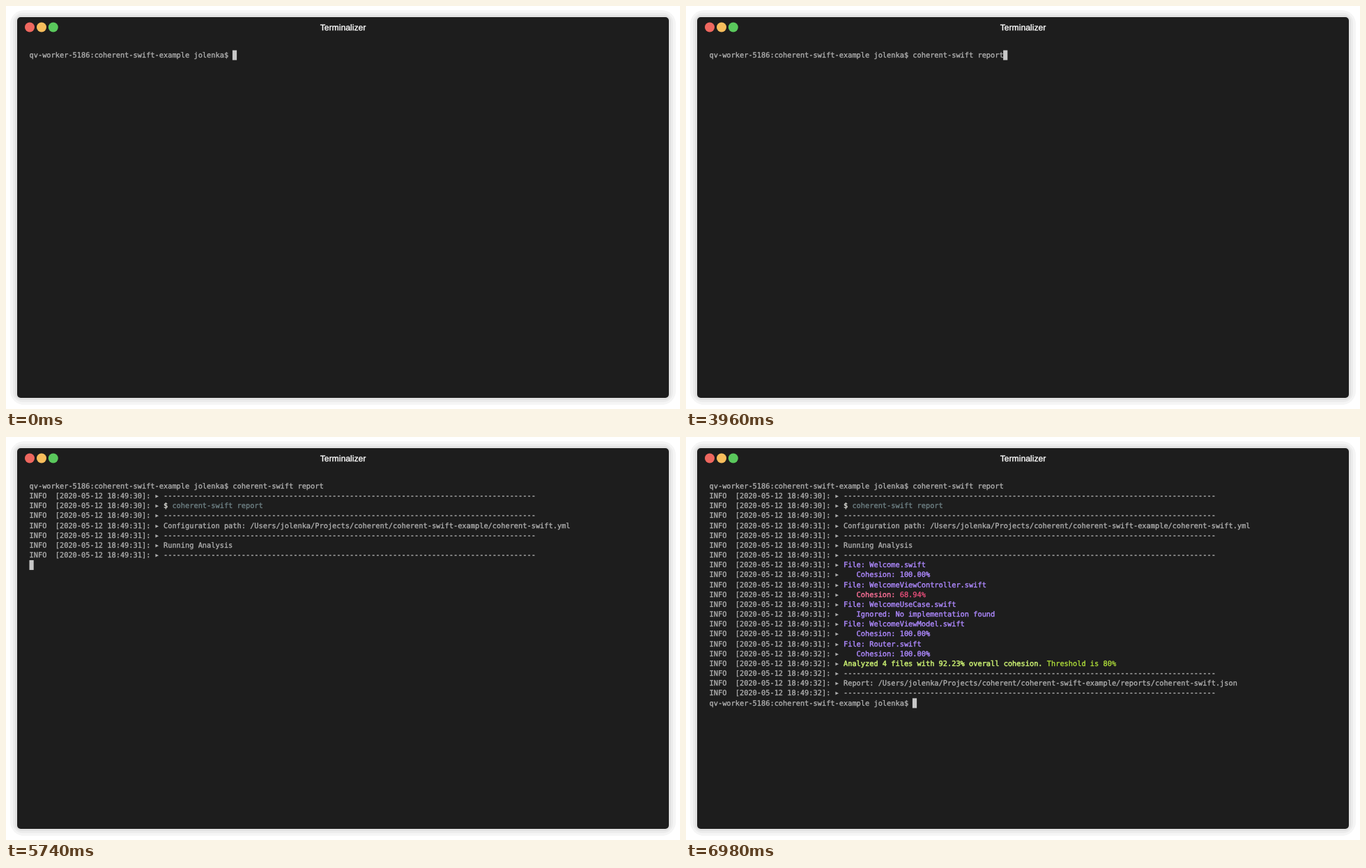
An HTML page for the animation above (8.98 s loop, 967 by 579 pixels).

```html
<!DOCTYPE html>
<html lang="en">
<head>
<meta charset="utf-8">
<title>Terminal</title>
<style>
  html, body { margin: 0; width: 100%; height: 100%; overflow: hidden; background: #fff; }
  svg { display: block; width: 100%; height: 100%; }
  text { white-space: pre; text-rendering: geometricPrecision; fill: currentColor; stroke: currentColor; }
  tspan { fill: currentColor; stroke: currentColor; }
  #rows { font: 10.32px "DejaVu Sans Mono", monospace; color: #b2b2b2; stroke-width: .3; }
  .title { font: 12.2px "Liberation Sans", Arial, sans-serif; color: #fff; stroke-width: .35; }
  .cmd { color: #708387; }
  .dollar { color: #d5d5d0; stroke-width: .4; }
  .file { color: #ae89fe; stroke-width: .4; }
  .low { color: #fb7098; stroke-width: .4; }
  .lowValue { color: #f0507f; }
  .total { color: #c8ed71; stroke-width: .5; }
  .limit { color: #b3e33b; }
</style>
</head>
<body>
<svg viewBox="0 0 967 579">
  <rect x="6" y="6" width="955" height="567" rx="20" fill="#f5f5f5"/>
  <rect x="10" y="10" width="947" height="559" rx="14" fill="#ececec"/>
  <rect x="13" y="13" width="941" height="553" rx="9" fill="#e2e2e2"/>
  <rect x="16" y="16" width="935" height="547" rx="5" fill="#1d1d1d"/>
  <circle cx="34" cy="30.5" r="7" fill="#ee675f"/>
  <circle cx="51" cy="30.5" r="7" fill="#f6bd5c"/>
  <circle cx="67.8" cy="30.5" r="7" fill="#5ac85c"/>
  <text class="title" x="483.5" y="35.2" text-anchor="middle">Terminalizer</text>
  <g id="rows"></g>
  <rect id="cursor" width="6.2" height="14.1" fill="#c7c7c7"/>
</svg>
<script>
const LOOP = 8980, LEFT = 33.5, TOP = 63.6, COL = 6.2, ROW = 14.17;
const NS = "http://www.w3.org/2000/svg";
const user = "jolenka";
const prompt = `qv-worker-5186:coherent-swift-example ${user}$ `;
const command = "coherent-swift report";
const home = `/Users/${user}/Projects/coherent/coherent-swift-example/`;

// Each span is [text, class]
const rule = ["-".repeat(86)];
const file = name => ["File: " + name + ".swift", "file"];
const note = text => ["   " + text, "file"];
const full = note("Cohesion: 100.00%");

const log = [
  [30, rule],
  [30, ["$ ", "dollar"], [command, "cmd"]],
  [30, rule],
  [31, ["Configuration path: " + home + "coherent-swift.yml"]],
  [31, rule],
  [31, ["Running Analysis"]],
  [31, rule],
  [31, file("Welcome")],
  [31, full],
  [31, file("WelcomeViewController")],
  [31, ["   Cohesion: ", "low"], ["68.94%", "lowValue"]],
  [31, file("WelcomeUseCase")],
  [31, note("Ignored: No implementation found")],
  [31, file("WelcomeViewModel")],
  [31, full],
  [31, file("Router")],
  [32, full],
  [32, ["Analyzed 4 files with 92.23% overall cohesion. ", "total"], ["Threshold is 80%", "limit"]],
  [32, rule],
  [32, ["Report: " + home + "reports/coherent-swift.json"]],
  [32, rule]
];

// [time, typed characters]
const keys = [[1010, 1], [1160, 2], [1270, 3], [2000, 15], [2940, 16], [2990, 17],
  [3550, 18], [3650, 19], [3790, 20], [3960, 21]];

const spread = (from, to, count) =>
  Array.from({ length: count }, (_, i) => from + (to - from) * i / (count - 1));
// Times at which the cursor moves down a row
const breaks = [5270, ...spread(5320, 5740, 7), ...spread(5810, 6130, 5),
  ...spread(6200, 6490, 5), 6560, ...spread(6770, 6910, 3)];
const PROMPT_AT = 6980;

const group = document.getElementById("rows");
const cursor = document.getElementById("cursor");

function addRow(index, spans) {
  const row = document.createElementNS(NS, "text");
  row.setAttribute("x", LEFT);
  row.setAttribute("y", TOP + 10.3 + index * ROW);
  for (const [text, name] of spans) {
    const span = document.createElementNS(NS, "tspan");
    span.textContent = text;
    if (name) span.setAttribute("class", name);
    row.append(span);
  }
  group.append(row);
  return row;
}

const input = addRow(0, [[prompt]]);
const lines = log.map(([second, ...spans], i) =>
  addRow(i + 1, [[`INFO  [2020-05-12 18:49:${second}]: ▸ `], ...spans]));
const lastPrompt = addRow(log.length + 1, [[prompt]]);

const show = (node, on) => node.setAttribute("visibility", on ? "visible" : "hidden");

function render(t) {
  const typed = keys.reduce((n, [at, count]) => t >= at ? count : n, 0);
  const row = breaks.filter(at => t >= at).length;
  const done = t >= PROMPT_AT;
  input.firstChild.textContent = prompt + command.slice(0, typed);
  lines.forEach((line, i) => show(line, i + 1 < row));
  show(lastPrompt, done);
  const col = row === 0 ? prompt.length + typed : done ? prompt.length : 0;
  cursor.setAttribute("x", LEFT + col * COL);
  cursor.setAttribute("y", TOP + row * ROW);
}

const start = performance.now();
function tick() {
  render((performance.now() - start) % LOOP);
  requestAnimationFrame(tick);
}
tick();
</script>
</body>
</html>
```
